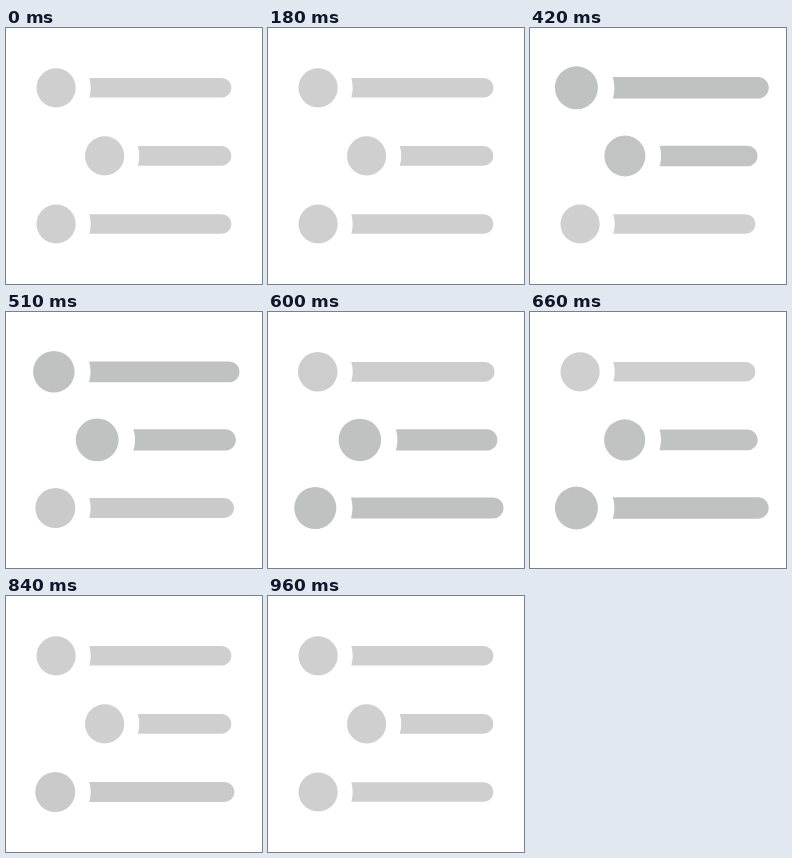
An HTML page with a canvas that plays this animation: 256x256 px, repeating every 1320 ms.

```html
<!DOCTYPE html>
<html lang="en">
<head>
<meta charset="utf-8">
<title>Pulsing list</title>
<style>
  html, body { margin: 0; width: 100%; height: 100%; overflow: hidden; background: #fff; }
  canvas { display: block; width: 100vw; height: 100vh; }
</style>
</head>
<body>
<canvas id="stage"></canvas>
<script>
const SIZE = 256, LOOP = 1320, STEP = 30;
const PULSE = 475, GROW = 0.098;
const DOT = 19.6, GAP = 34.6, HALF = 9.8, RIGHT = 225.4;
const REST = [207, 207, 207], ACTIVE = [192, 194, 193];

const rows = [
  { x: 50.1, y: 59.8, pivot: 88, start: 170 },
  { x: 98.6, y: 127.9, pivot: 178, start: 305 },
  { x: 50.1, y: 196, pivot: 88, start: 440 }
];

const canvas = document.getElementById('stage');
const ctx = canvas.getContext('2d');
const ratio = window.devicePixelRatio || 1;
canvas.width = canvas.height = SIZE * ratio;

function pulse(t) {
  if (t <= 0 || t >= PULSE) return 0;
  return (1 - Math.cos(2 * Math.PI * t / PULSE)) / 2;
}

function tint(k) {
  const mix = REST.map((c, i) => Math.round(c + (ACTIVE[i] - c) * k));
  return `rgb(${mix.join(',')})`;
}

function drawRow({ x, y, pivot, start }, time) {
  const v = pulse(time - start);
  const scale = 1 + GROW * v;
  ctx.save();
  ctx.translate(pivot, y);
  ctx.scale(scale, scale);
  ctx.translate(-pivot, 0);
  ctx.fillStyle = tint(Math.min(1, v * 1.8));

  ctx.beginPath();
  ctx.arc(x, 0, DOT, 0, 2 * Math.PI);
  ctx.fill();

  // Bar: round right end, left end hollowed concentric with the dot
  const bite = Math.asin(HALF / GAP);
  ctx.beginPath();
  ctx.arc(RIGHT - HALF, 0, HALF, -Math.PI / 2, Math.PI / 2);
  ctx.arc(x, 0, GAP, bite, -bite, true);
  ctx.closePath();
  ctx.fill();
  ctx.restore();
}

function frame(now) {
  const time = Math.floor((now % LOOP) / STEP) * STEP;
  ctx.setTransform(ratio, 0, 0, ratio, 0, 0);
  ctx.fillStyle = '#fff';
  ctx.fillRect(0, 0, SIZE, SIZE);
  rows.forEach(row => drawRow(row, time));
}

const origin = performance.now();
function tick() {
  frame(performance.now() - origin);
  requestAnimationFrame(tick);
}
tick();
</script>
</body>
</html>
```
